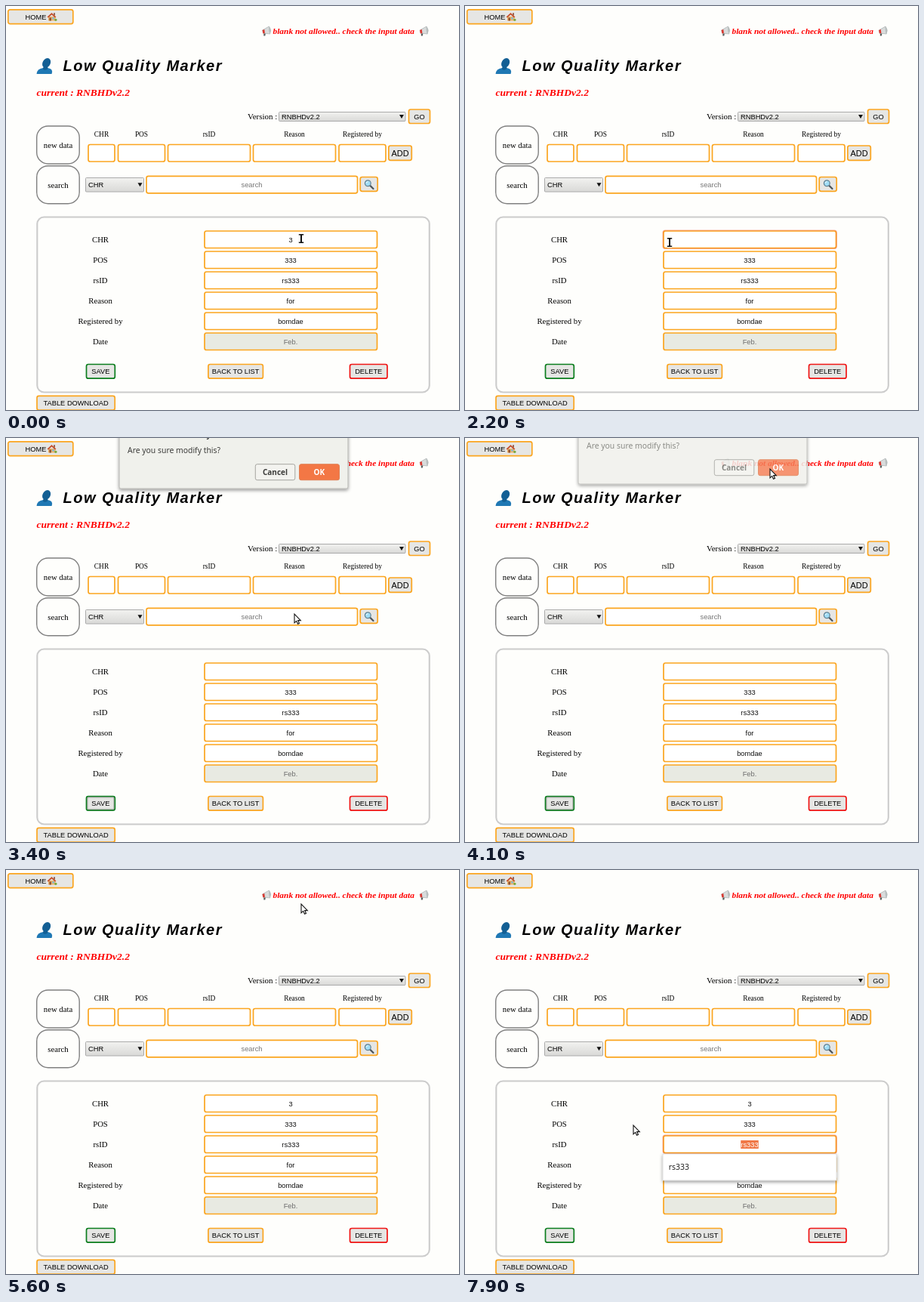
Write an HTML page that moves like this. It is 600 by 535 pixels and loops after 8 s.

```html
<!DOCTYPE html>
<html lang="en">
<head>
<meta charset="utf-8">
<title>Low Quality Marker</title>
<style>
  html, body { margin: 0; width: 100%; height: 100%; overflow: hidden; background: #fefefc; }
  svg { display: block; width: 100%; height: 100%; }
  text { white-space: pre; }
  .sans { font-family: "Liberation Sans", Arial, sans-serif; font-size: 9.3px; }
  .serif { font-family: "Liberation Serif", Times, serif; font-size: 10.7px; }
  .ui { font-family: "Noto Sans", sans-serif; font-size: 10.4px; }
  .notice { font: italic bold 11.4px "Liberation Serif", Times, serif; }
  .current { font: italic bold 13.5px "Liberation Serif", Times, serif; }
  .title { font: italic bold 20px "Liberation Sans", Arial, sans-serif; letter-spacing: 1.5px; }
  .mid { text-anchor: middle; }
</style>
</head>
<body>
<svg viewBox="0 0 600 535">
  <defs>
    <linearGradient id="grey" x2="0" y2="1"><stop stop-color="#f2f2f0"/><stop offset="1" stop-color="#d9d9d7"/></linearGradient>
    <filter id="shadow" x="-10%" y="-30%" width="120%" height="170%">
      <feDropShadow dx="0" dy="2" stdDeviation="2.2" flood-opacity=".4"/>
    </filter>
    <g id="megaphone" transform="skewX(-10)">
      <path d="M2 5L10 0L13 10L4 9Z" fill="#d9dcdc" stroke="#aab0b0" stroke-width=".7"/>
      <path d="M10 0Q15 4 13 10Q10 6 10 0Z" fill="#b8bebe"/>
      <path d="M2 5L4.5 4L6 9L3.5 9.5Z" fill="#d83a32"/>
      <path d="M4.5 9.5L7 9.5L7 12.5L5 12.5Z" fill="#555b5b"/>
    </g>
    <g id="house">
      <path d="M1.5 5.5H11V11H1.5Z" fill="#eab16a"/>
      <path d="M0 6L6 .5L12 6L10.5 7L6 3L1.5 7Z" fill="#c5502d"/>
      <path d="M8.7 .8H10.4V4.4L8.7 3Z" fill="#8b4a35"/>
      <path d="M3 7H5.3V11H3Z" fill="#8a4b2c"/>
      <path d="M6.8 6.7H9.3V9H6.8Z" fill="#75bde0"/>
      <circle cx="11.4" cy="9.8" r="1.6" fill="#78a83b"/>
    </g>
    <g id="magnifier">
      <path d="M7.5 7.5L12 12" stroke="#4b5358" stroke-width="2.2" stroke-linecap="round"/>
      <circle cx="4.8" cy="4.8" r="3.9" fill="#9fdcf5" stroke="#5f7f90" stroke-width="1.2"/>
      <path d="M2.7 4.4Q3.1 2.8 4.8 2.6" fill="none" stroke="#fff"/>
    </g>
    <g id="bust" transform="skewX(-12)">
      <path d="M1 21Q0 14 8 13H14Q22 14 21 21Z" fill="#1f78b4"/>
      <ellipse cx="11" cy="6.5" rx="5.4" ry="6.5" fill="#135f94"/>
      <path d="M8 12H14V14.5Q11 17 8 14.5Z" fill="#135f94"/>
    </g>
    <path id="arrow" d="M0 0V11.8L2.7 9.3L4.5 13.3L6.5 12.4L4.7 8.6H8.3Z" fill="#fff" stroke="#111" stroke-width="1.1"/>
    <g id="beam" fill="none">
      <path d="M-3-5.5H3M-3 5.5H3M0-5.5V5.5" stroke="#fff" stroke-width="3.4"/>
      <path d="M-3.2-5.3H3.2M-3.2 5.3H3.2" stroke="#111" stroke-width="1.4"/>
      <path d="M0-5.3V5.3" stroke="#111" stroke-width="2"/>
    </g>
  </defs>
  <g id="page"></g>
  <g id="live"></g>
</svg>
<script>
const ORANGE = '#fba51f', VERSION = 'RNBHDv2.2';
const LOOP = 8000, STEP = 100;

const text = (x, y, str, cls, extra = '') => `<text x="${x}" y="${y}" class="${cls}" ${extra}>${str}</text>`;
const box = (x, y, w, h, fill, stroke, width = 1.7, r = 2.5, extra = '') =>
  `<rect x="${x}" y="${y}" width="${w}" height="${h}" rx="${r}" fill="${fill}" stroke="${stroke}" stroke-width="${width}" ${extra}/>`;
const icon = (id, x, y) => `<use href="#${id}" x="${x}" y="${y}"/>`;
const button = (x, y, w, h, label, stroke = ORANGE, size = 9.3) =>
  box(x, y, w, h, '#e6e6e4', stroke) +
  text(x + w / 2, y + h / 2 + size * .36, label, 'sans mid', `style="font-size:${size}px"`);
const input = (x, y, w, fill = '#fff') => box(x, y, w, 22.5, fill, ORANGE);
const select = (x, y, w, h, label) =>
  box(x, y, w, h, 'url(#grey)', '#aaa', 1, 1) +
  text(x + 3.5, y + h / 2 + 3.4, label, 'sans') +
  `<path d="M${x + w - 8} ${y + h / 2 - 2.5}h6l-3 5z" fill="#111"/>`;

const rowY = i => 309.5 + 27 * i;
const value = (i, str, color = '#111') => text(377, rowY(i) + 3.4, str, 'sans mid', `fill="${color}"`);

function drawPage() {
  const columns = [['CHR', 126.5, 109, 35], ['POS', 179.5, 148.5, 62], ['rsID', 269, 214.5, 109],
    ['Reason', 382, 327.5, 109], ['Registered by', 472, 441, 62]];
  const rows = ['CHR', 'POS', 'rsID', 'Reason', 'Registered by', 'Date'];
  return [
    button(2.8, 4.8, 86, 18.8, ''), text(25.5, 17.6, 'HOME', 'sans'), icon('house', 54.5, 8.5),
    icon('megaphone', 338.5, 27), icon('megaphone', 547, 27),
    text(353.5, 37.2, 'blank not allowed.. check the input data', 'notice', 'fill="#f00"'),
    icon('bust', 44, 69), text(75.5, 86.2, 'Low Quality Marker', 'title'),
    text(40.5, 119, 'current : ' + VERSION, 'current', 'fill="#f00"'),
    text(320, 149.8, 'Version :', 'serif', 'style="font-size:11px"'),
    select(361.5, 140.5, 167.5, 12, VERSION), button(533.5, 137, 28, 18.5, 'GO'),
    ...columns.map(([name, center, x, w]) =>
      text(center, 173, name, 'serif mid', 'style="font-size:9.4px"') + input(x, 183.5, w)),
    button(506.8, 185, 30.5, 19.3, 'ADD', ORANGE, 10.9),
    ...['new data', 'search'].map((name, i) =>
      box(40.7, 159 + 52.7 * i, 56.5, 50, 'none', '#808080', 1.4, 15) +
      text(69, 187.5 + 53 * i, name, 'serif mid')),
    select(105.5, 227.5, 77, 18.5, 'CHR'), input(186, 225.3, 279.5),
    text(325.5, 240, 'search', 'sans mid', 'fill="#757575"'),
    button(469.2, 226.5, 23, 18.8, ''), icon('magnifier', 474.5, 230),
    box(41.3, 279.5, 519.5, 232, 'none', '#ccc', 2.1, 9),
    ...rows.map((name, i) =>
      text(125, rowY(i) + 3.5, name, 'serif mid') +
      input(263, rowY(i) - 11.5, 228.5, name === 'Date' ? '#e8eae2' : '#fff')),
    value(1, '333'), value(3, 'for'), value(4, 'bomdae'), value(5, 'Feb.', '#6d6d6d'),
    button(106.5, 474.5, 37.8, 18.7, 'SAVE', '#0b7d1d'),
    button(267.9, 474.5, 72.5, 18.7, 'BACK TO LIST'),
    button(455.5, 474.5, 49.5, 18.7, 'DELETE', '#f01515'),
    button(41, 516.4, 103.2, 18.7, 'TABLE DOWNLOAD'),
  ].join('');
}

// time, x, y; the arrow is placed by its tip, the beam by its centre
const pointerPath = [
  [400, 391, 308], [700, 271, 313], [2200, 271, 313], [2400, 190, 360], [2600, 74, 445],
  [2800, 117, 481], [3100, 117, 481], [3200, 190, 425], [3400, 382, 233], [3600, 494, 75],
  [3900, 404, 41], [4600, 404, 41], [4900, 356, 38], [5300, 528, 39], [5600, 391, 45],
  [5700, 376, 48], [6100, 563, 48], [6400, 563, 48], [6800, 312, 315], [6900, 284, 345],
  [7100, 306, 386], [7300, 396, 364], [7400, 396, 364], [7700, 228, 344], [7800, 228, 344],
  [7900, 223, 338]];
const between = (t, from, to) => t >= from && t < to;
const ramp = (t, from, to) => Math.min(1, Math.max(0, (t - from) / (to - from)));

function pointer(t) {
  const next = pointerPath.findIndex(p => p[0] >= t);
  const b = pointerPath[next], a = pointerPath[Math.max(0, next - 1)];
  const k = ramp(t, a[0], b[0] > a[0] ? b[0] : a[0] + 1);
  const at = i => a[i] + (b[i] - a[i]) * k;
  const isBeam = t <= 2200 || between(t, 6800, 7900);
  return icon(isBeam ? 'beam' : 'arrow', at(1), at(2));
}

const focusRing = i => box(262.2, rowY(i) - 12.3, 230, 24.1, 'none', '#f0703c', 1.3, 3, 'opacity=".55"');

const selected = (i, str, w) =>
  `<rect x="${377 - w / 2}" y="${rowY(i) - 5.5}" width="${w}" height="11" fill="#f07746"/>` + value(i, str, '#fff');

function popup(i, entries, opacity) {
  const top = rowY(i) + 12.5;
  return `<g opacity="${opacity}">` +
    box(262, top, 230, 8 + 27 * entries.length, '#fff', '#d2d2d2', .7, 0, 'filter="url(#shadow)"') +
    entries.map((str, n) => text(269.8, top + 21 + 27 * n, str, 'ui', 'fill="#222"')).join('') + '</g>';
}

function dialog(t) {
  const closing = t >= 4000;
  const opacity = closing ? [1, .85, .45, .15][(t - 4000) / STEP] : [.4, .8][(t - 3000) / STEP] ?? 1;
  const lift = closing ? (t - 4000) * .06 : 6 * (1 - ramp(t, 3000, 3200));
  const ink = closing ? '#777772' : '#3c3c3a';
  const bold = 'font-weight="600" style="font-size:10px"';
  return `<g opacity="${opacity}" transform="translate(0 ${-lift})">` +
    box(150, -40, 303, 107, '#f0f1ec', '#b4b4b0', 1, 2, 'filter="url(#shadow)"') +
    text(265.5, -1.5, 'y', 'ui', `fill="${ink}" font-weight="bold"`) +
    text(161, 20, 'Are you sure modify this?', 'ui', `fill="${ink}"`) +
    box(330.3, 34.7, 52.5, 21, '#f3f3ef', '#a5a5a0', 1) +
    text(356.5, 48.6, 'Cancel', 'ui mid', `fill="${ink}" ${bold}`) +
    box(388.5, 34.7, 53, 21, closing ? '#f5825a' : '#f37745', '#e08055', 1) +
    text(414.8, 48.6, 'OK', 'ui mid', `fill="#fff" ${bold}`) + '</g>';
}

function drawLive(t) {
  const parts = [];
  if (between(t, 400, 2800)) parts.push(focusRing(0));
  if (between(t, 500, 1600)) parts.push(selected(0, '3', 5.2));
  else if (!between(t, 1600, 4300)) parts.push(value(0, '3'));

  if (t >= 7400) parts.push(focusRing(2));
  parts.push(t >= 7600 ? selected(2, 'rs333', 23.5) : value(2, 'rs333'));

  if (between(t, 500, 1900)) parts.push(popup(0, ['3', '33'], ramp(t, 400, 600) * (1 - ramp(t, 1500, 1900))));
  if (t >= 7500) parts.push(popup(2, ['rs333'], ramp(t, 7400, 7600)));

  if (between(t, 2900, 4300)) parts.push(box(107.8, 475.8, 35.2, 16.1, 'none', '#6f7f6f', .8, 1));
  if (between(t, 3000, 4400)) parts.push(dialog(t));
  parts.push(pointer(t));
  return parts.join('');
}

document.getElementById('page').innerHTML = drawPage();
const live = document.getElementById('live');
const start = performance.now();
let shown = -1;
function tick() {
  const t = Math.floor((performance.now() - start) % LOOP / STEP) * STEP;
  if (t !== shown) live.innerHTML = drawLive(shown = t);
  requestAnimationFrame(tick);
}
tick();
</script>
</body>
</html>
```
